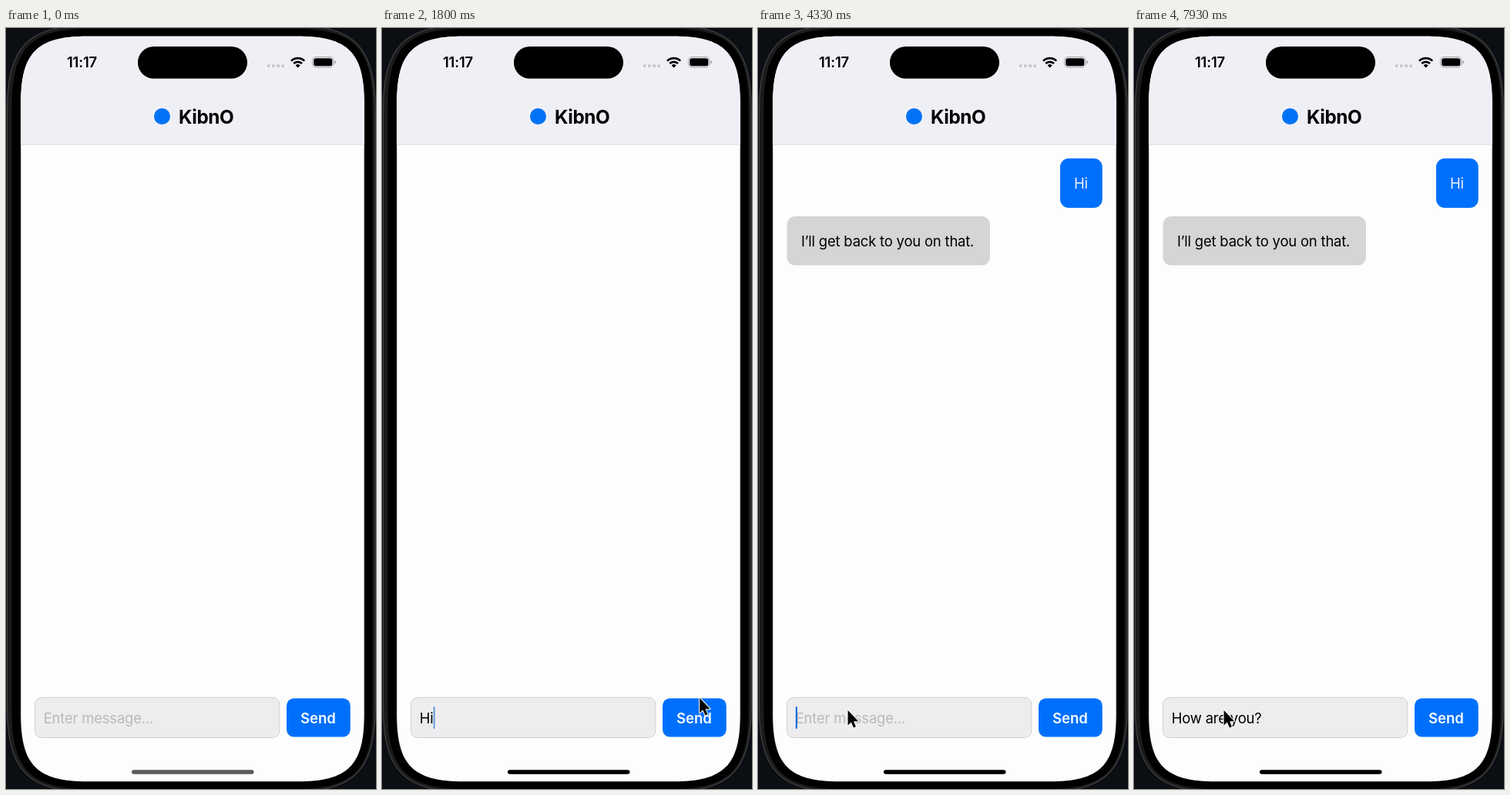
These frames come from a looping animation (480x986 px, 8 s). An HTML page:

```html
<!DOCTYPE html>
<html lang="en">
<head>
<meta charset="utf-8">
<title>Chat demo</title>
<style>
html, body { margin: 0; width: 100%; height: 100%; overflow: hidden; background: #0b0e13; }
svg { display: block; width: 480px; height: 986px; }
text { font: 400 18.5px Inter, "Liberation Sans", sans-serif; letter-spacing: -0.22px; white-space: pre; }
.clock { font-weight: 600; }
.title { font-size: 24.3px; font-weight: 700; letter-spacing: -0.4px; }
.send { font-weight: 600; letter-spacing: 0; fill: #fcfcfd; }
.hint { fill: #bababd; }
</style>
</head>
<body>
<svg viewBox="0 0 480 986">
  <defs><clipPath id="clip"><path id="screen"/></clipPath></defs>
  <rect width="480" height="986" fill="#0b0e13"/>
  <path id="frame" fill="#1b1b1c" stroke="#444445" stroke-width="1.2"/>
  <path id="bezel"/>
  <g clip-path="url(#clip)">
    <rect width="480" height="986" fill="#fdfdfe"/>
    <rect width="480" height="151" fill="#efeff6"/>
    <rect y="150.3" width="480" height="1" fill="#d8d8de"/>
  </g>

  <text class="clock" x="79" y="51">11:17</text>
  <rect x="171" y="24" width="142" height="41.5" rx="20.7"/>
  <path d="M340.8 49h20" stroke="#c4c4ca" stroke-width="4" stroke-linecap="round" stroke-dasharray="0 6.1"/>
  <g fill="none" stroke="#000" stroke-width="2.7">
    <path d="M370 42.6a12.2 12.2 0 0 1 17.2 0"/>
    <path d="M373.2 46a7.7 7.7 0 0 1 10.8 0"/>
  </g>
  <path d="M375.6 48.4a4.3 4.3 0 0 1 6 0l-3 3z"/>
  <rect x="397.5" y="37.5" width="27.5" height="13.4" rx="4.4" fill="none" stroke="#a2a2a7"/>
  <rect x="399.2" y="39.2" width="24.1" height="10" rx="2.8"/>
  <path d="M426.3 41.9q1.8 .6 1.8 2.3t-1.8 2.3z" fill="#a2a2a7"/>

  <circle cx="202.5" cy="114.5" r="10.5" fill="#0272f5"/>
  <text class="title" x="224" y="123.5">KibnO</text>

  <g id="sent">
    <rect x="392" y="169" width="54.7" height="64" rx="11" fill="#0070fc"/>
    <text x="410" y="208" fill="#eef3fb">Hi</text>
  </g>
  <g id="reply">
    <rect x="37.5" y="244" width="263.5" height="63.5" rx="11" fill="#d5d5d7"/>
    <text x="56" y="283">I’ll get back to you on that.</text>
  </g>

  <rect x="37.5" y="867.3" width="317.3" height="52.2" rx="9" fill="#ededef" stroke="#d0d0d3"/>
  <text id="hint" class="hint" x="48.7" y="900.7">Enter message...</text>
  <text id="typed" x="48.7" y="900.7"></text>
  <rect id="caret" y="879" width="2.2" height="29" rx="1" fill="#1c72d8"/>
  <rect x="364" y="868.5" width="82.7" height="50" rx="9.5" fill="#0070fc"/>
  <text class="send" x="382" y="900.7">Send</text>
  <rect id="home" x="163" y="961.2" width="158.5" height="5.6" rx="2.8"/>
  <path id="pointer" d="M0 0V19.4L4.3 15.4L7.3 22.6L10.4 21.3L7.5 14.3H13.6Z"
    stroke="#fdfdfe" stroke-width="2" paint-order="stroke" stroke-linejoin="round"/>
</svg>
<script>
const $ = id => document.getElementById(id);
const LOOP = 8000, FOCUS = 560, SEND = 1930, REPLY = 4200;

// Rectangle with smooth, continuous corners that start at distance a
function smoothRect(x, y, w, h, a) {
  const c = a * 0.24, r = x + w, b = y + h;
  return `M${x + a} ${y}H${r - a}C${r - c} ${y} ${r} ${y + c} ${r} ${y + a}` +
    `V${b - a}C${r} ${b - c} ${r - c} ${b} ${r - a} ${b}` +
    `H${x + a}C${x + c} ${b} ${x} ${b - c} ${x} ${b - a}` +
    `V${y + a}C${x} ${y + c} ${x + c} ${y} ${x + a} ${y}Z`;
}
$('screen').setAttribute('d', smoothRect(19.2, 10.8, 445.5, 965.4, 87));
$('bezel').setAttribute('d', smoothRect(7.5, 1, 468, 985, 102));
$('frame').setAttribute('d', smoothRect(1.5, -4, 477.5, 994, 112));

const clamp = u => Math.max(0, Math.min(1, u));
const ease = u => u * u * (3 - 2 * u);

// Evenly typed parts of a message
const first = [{ at: 800, step: 130, text: 'Hi' }];
const second = [
  { at: 5930, step: 385, text: 'How' },
  { at: 6870, step: 108, text: ' are you?' }
];
const typedBy = (parts, t) => parts
  .map(p => p.text.slice(0, Math.max(0, Math.floor((t - p.at) / p.step) + 1)))
  .join('');

// The caret blinks once a second; these moments restart the cycle
const restarts = [FOCUS, 930, 2600, REPLY, 7400];
function caretLevel(t) {
  if (t < FOCUS) return 0;
  const phase = (t - restarts.findLast(r => r <= t)) % 1000;
  return phase < 600 ? 1 - clamp((phase - 200) / 330) : clamp((phase - 670) / 330);
}

// Each move ends at x, y and the pointer rests there
const moves = [
  { from: 70, to: 520, x: 180, y: 886 },
  { from: 960, to: 1460, x: 412, y: 868 },
  { from: 2000, to: 2560, x: 438, y: 640.5 },
  { from: 2800, to: 3130, x: 378, y: 720 },
  { from: 3270, to: 3700, x: 98, y: 884 },
  { from: 3740, to: 3930, x: 116.6, y: 884 }
];
function pointerAt(t) {
  let x = 482, y = 800;
  for (const m of moves) {
    const u = ease(clamp((t - m.from) / (m.to - m.from)));
    x += (m.x - x) * u;
    y += (m.y - y) * u;
  }
  return `translate(${x} ${y})`;
}

const show = (el, on) => { el.style.visibility = on ? 'visible' : 'hidden'; };

function draw(t) {
  const text = typedBy(t < SEND ? first : second, t);
  const typed = $('typed');
  if (typed.textContent !== text) typed.textContent = text;
  show($('hint'), !text);
  show($('sent'), t >= SEND);
  show($('reply'), t >= REPLY);
  $('caret').setAttribute('x', 48.8 + (text ? typed.getComputedTextLength() : 0));
  $('caret').style.opacity = caretLevel(t);
  $('home').style.opacity = 0.64 + 0.36 * clamp((t - 70) / 530);
  $('pointer').setAttribute('transform', pointerAt(t));
  show($('pointer'), t >= 70);
}

const start = performance.now();
function tick() {
  draw((performance.now() - start) % LOOP);
  requestAnimationFrame(tick);
}
tick();
</script>
</body>
</html>
```
